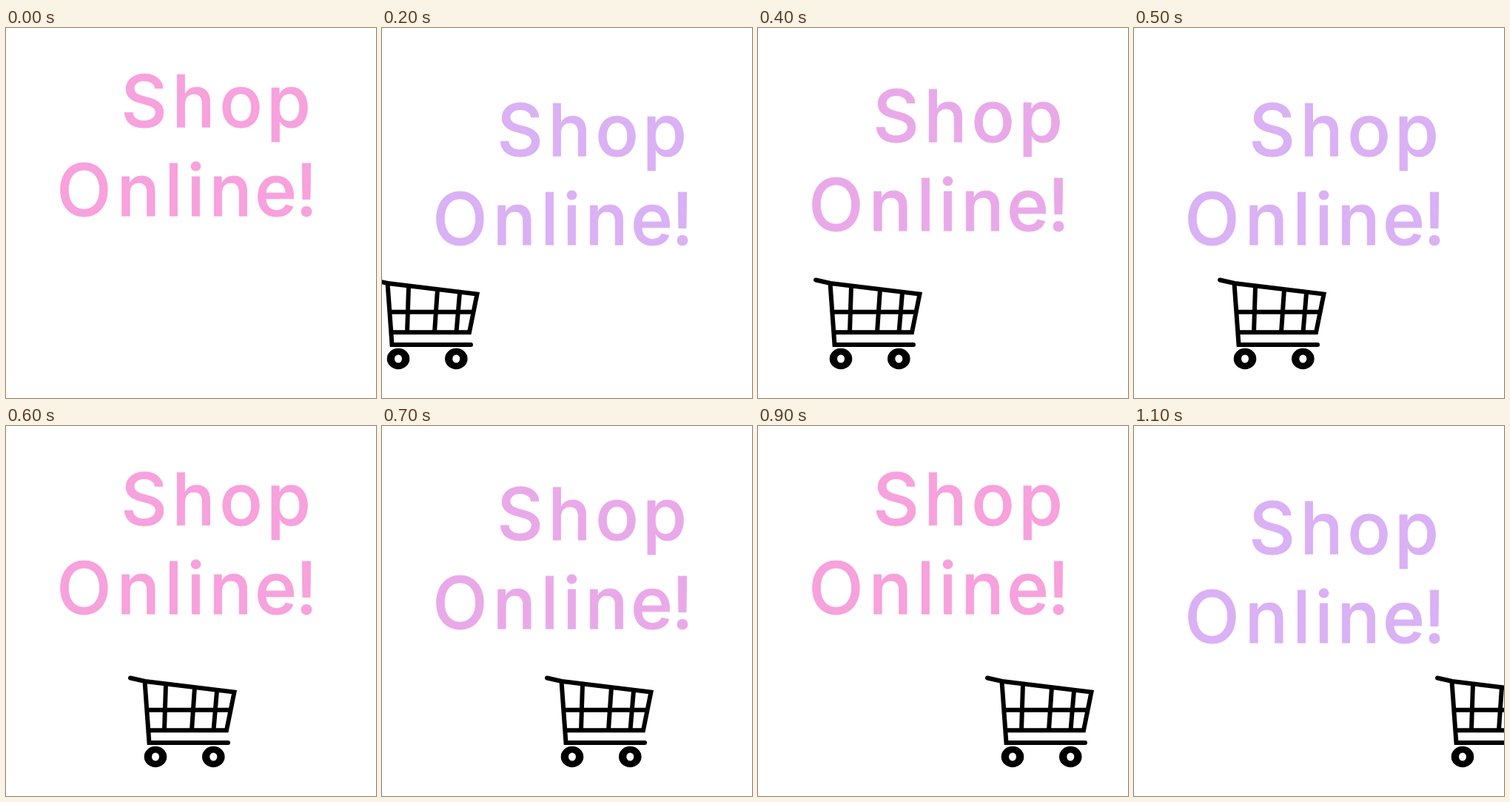
These frames come from a looping animation (500 by 500 pixels, 1200 ms). An HTML page:

```html
<!DOCTYPE html>
<html lang="en">
<head>
<meta charset="utf-8">
<title>Shop Online!</title>
<style>
  html, body { margin: 0; width: 100%; height: 100%; overflow: hidden; background: #fff; }
  svg { display: block; width: 100%; height: 100%; }
  text {
    font: 500 97px Montserrat, Inter, "Open Sans", sans-serif;
    text-anchor: middle;
    fill: currentColor;
    stroke: currentColor;
    stroke-width: 0.8px;
  }
</style>
</head>
<body>
<svg viewBox="0 0 500 500">
  <!-- each x is the centre of one letter -->
  <g id="words">
    <text x="186.5 253.5 317.5 382" y="134">Shop</text>
    <text x="105.5 179 226.5 256.5 303.5 364.5 406" y="254">Online!</text>
  </g>
  <g id="cart">
    <g fill="none" stroke="#000" stroke-width="6" stroke-linecap="round">
      <path d="M40 340.5L60 345L180.5 359.5L170 411.3H66M59.5 345L65.5 428H172"/>
      <path d="M63 383.7H175M88 349L86 411M127 353L123 411M157 358L152.5 411" stroke-linecap="butt"/>
    </g>
    <g id="wheel">
      <ellipse cx="74" cy="447" rx="15.3" ry="14.2"/>
      <ellipse cx="74" cy="447" rx="5" ry="5.6" fill="#fff"/>
    </g>
    <use href="#wheel" x="78.3"/>
  </g>
</svg>
<script>
  const words = document.getElementById("words");
  const cart = document.getElementById("cart");
  const STEP = 100;
  const cartX = [-190, -112, -52, 0, 38, 76, 128, 183, 236, 270, 320, 370];
  const colors = ["#f7a1dd", "#e9a9e9", "#dab1f4"];
  const DROP = 19.5;

  function draw(now) {
    const step = Math.floor(now / STEP) % cartX.length;
    const beat = step % colors.length;
    words.setAttribute("color", colors[beat]);
    words.setAttribute("transform", `translate(0 ${beat * DROP})`);
    cart.setAttribute("transform", `translate(${cartX[step]} 0)`);
  }

  let start;
  function tick(now) {
    start ??= now;
    draw(now - start);
    requestAnimationFrame(tick);
  }
  draw(0);
  requestAnimationFrame(tick);
</script>
</body>
</html>
```
